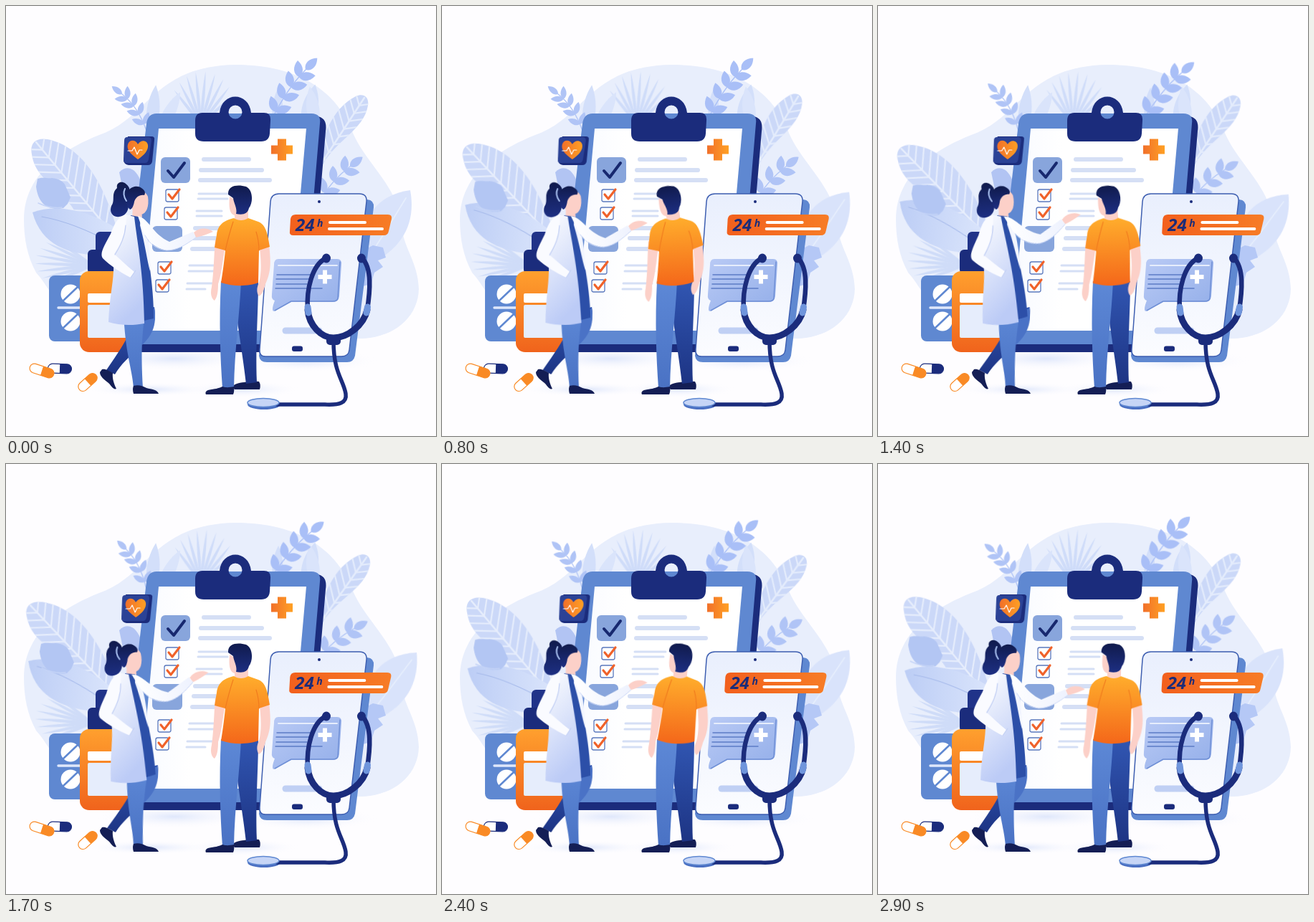
Recreate the animation shown at these times as an HTML page. Size 600x600 px, loop 3000 ms.

```html
<!DOCTYPE html>
<html lang="en">
<head>
<meta charset="utf-8">
<title>Online health check</title>
<style>
html, body { margin: 0; width: 100%; height: 100%; overflow: hidden; background: #fefdff; }
svg { display: block; width: 600px; height: 600px; }
.ln { fill: none; stroke-linecap: round; stroke-linejoin: round; }
text { font-family: "Open Sans", "Noto Sans", sans-serif; font-weight: 700; font-style: italic; fill: #1c2c78; }
</style>
</head>
<body>
<svg id="stage" viewBox="0 0 600 600" xmlns="http://www.w3.org/2000/svg"></svg>
<script>
const NAVY = '#1b2c7c', BLUE = '#5f88d1', SKIN = '#fcd0c8', INK = '#141e55';

const path = (d, fill, more = '') => `<path d="${d}" fill="${fill}" ${more}/>`;
const line = (d, color, w = 2) => `<path class="ln" d="${d}" stroke="${color}" stroke-width="${w}"/>`;
const rect = (x, y, w, h, r, fill, more = '') =>
  `<rect x="${x}" y="${y}" width="${w}" height="${h}" rx="${r}" fill="${fill}" ${more}/>`;
const oval = (x, y, rx, ry, fill, more = '') =>
  `<ellipse cx="${x}" cy="${y}" rx="${rx}" ry="${ry}" fill="${fill}" ${more}/>`;
const group = (id, body) => `<g id="${id}">${body}</g>`;
const grad = (name, a, b, x2 = 0, y2 = 1) =>
  `<linearGradient id="${name}Fill" x2="${x2}" y2="${y2}"><stop stop-color="${a}"/><stop offset="1" stop-color="${b}"/></linearGradient>`;
const use = name => `url(#${name}Fill)`;

function leaf(x, y, deg, len, w, fill) {
  const d = `M0,0C${len * .2},${-w} ${len * .65},${-w} ${len},0C${len * .65},${w} ${len * .2},${w} 0,0Z`;
  return path(d, fill, `transform="translate(${x},${y}) rotate(${deg})"`);
}

// Curved stem with leaf pairs and one leaf at the tip.
function branch([x0, y0], [cx, cy], [x1, y1], pairs, len, w, fill) {
  let out = line(`M${x0},${y0}Q${cx},${cy} ${x1},${y1}`, fill, 1.4);
  const deg = (x, y) => Math.atan2(y, x) * 180 / Math.PI;
  for (let i = 0; i < pairs; i++) {
    const t = .14 + .68 * i / (pairs - 1), u = 1 - t;
    const x = u * u * x0 + 2 * u * t * cx + t * t * x1;
    const y = u * u * y0 + 2 * u * t * cy + t * t * y1;
    const a = deg(u * (cx - x0) + t * (x1 - cx), u * (cy - y0) + t * (y1 - cy));
    out += leaf(x, y, a - 45, len, w, fill) + leaf(x, y, a + 45, len, w, fill);
  }
  return out + leaf(x1, y1, deg(x1 - cx, y1 - cy), len, w, fill);
}

function fan(x, y, from, to, n, len, fill) {
  let out = '';
  for (let i = 0; i < n; i++) {
    const k = i / (n - 1);
    out += leaf(x, y, from + (to - from) * k, len * (.82 + .18 * Math.sin(Math.PI * k)), 2.8, fill);
  }
  return out;
}

// Broad leaf with pale veins on both sides of a straight rib.
function veined(id, d, [x0, y0], [x1, y1], n, len, fill, vein) {
  let veins = line(`M${x0},${y0}L${x1},${y1}`, vein, 2.5);
  const a = Math.atan2(y1 - y0, x1 - x0);
  for (let i = 1; i < n; i++) {
    const x = x0 + (x1 - x0) * i / n, y = y0 + (y1 - y0) * i / n;
    for (const s of [-.85, .85])
      veins += line(`M${x},${y}l${len * Math.cos(a + s)},${len * Math.sin(a + s)}`, vein, 2.2);
  }
  return `<clipPath id="${id}Clip"><path d="${d}"/></clipPath>` +
    path(d, fill) + `<g clip-path="url(#${id}Clip)">${veins}</g>`;
}

const bars = (list, color, w) => list.map(([x, y, x2]) => line(`M${x},${y}H${x2}`, color, w)).join('');

const tick = (x, y) =>
  rect(x, y, 18, 17, 2.5, '#fff', 'stroke="#5a78bd" stroke-width="1.3"') +
  line(`M${x + 4},${y + 7}l5,6l10,-13`, '#f0622a', 3.2);

const plus = (x, y, r, w, fill) =>
  path(`M${x - w},${y - r}h${2 * w}v${r - w}h${r - w}v${2 * w}h${w - r}v${r - w}h${-2 * w}v${w - r}h${w - r}v${-2 * w}h${r - w}z`, fill);

const pill = (x, y, deg, len, color) => `<g transform="translate(${x},${y}) rotate(${deg})">` +
  rect(-len / 2, -6.5, len, 13, 6.5, '#fff', `stroke="${color}" stroke-width="1.2"`) +
  path(`M0,-6.5H${len / 2 - 6.5}a6.5,6.5 0 0 1 0,13H0z`, color) + '</g>';

const defs = '<defs>' +
  grad('shirt', '#ffad2c', '#f4671a') + grad('bottle', '#ffa02e', '#f0631c') +
  grad('banner', '#f2601d', '#f77c26', 1, 0) + grad('plus', '#f1702a', '#ffa024', 1, 0) +
  grad('coat', '#ffffff', '#bccbf6', .3) + grad('sleeve', '#ffffff', '#eef2fe', 1, 0) +
  grad('leafy', '#bccdf5', '#dce6fc', 1, 0) + grad('screen', '#e9effd', '#fbfcff') +
  grad('paper', '#f8faff', '#ffffff', .3, 0) + grad('jeans', '#5d88d6', '#4a72c4') +
  grad('dark', '#3156b2', '#1d3484') + grad('bubble', '#b9caf5', '#93aee9', 1, 1) +
  grad('hair', '#101a4c', '#1d2f82') +
  '<radialGradient id="floorFill"><stop stop-color="#dfe7fb"/><stop offset="1" stop-color="#fefdff" stop-opacity="0"/></radialGradient></defs>';

const backdrop =
  path('M25,298C25,240 70,204 130,180C200,156 205,84 320,82C410,82 460,120 482,172C498,216 546,250 551,300C553,338 575,355 576,395C575,435 540,465 490,464C350,450 180,470 90,425C62,408 60,392 42,372C30,350 25,325 25,298Z', '#e8eefc') +
  oval(235, 492, 110, 17, use('floor')) + oval(200, 535, 90, 10, use('floor')) +
  oval(330, 535, 80, 12, use('floor')) + oval(420, 495, 100, 16, use('floor'));

const plants =
  group('fanTop', fan(272, 165, -128, -42, 9, 74, '#cfdcf9')) +
  leaf(202, 178, -84, 68, 12, '#d3dffa') + leaf(214, 175, -62, 62, 11, '#dae4fb') +
  leaf(378, 172, -88, 58, 10, '#d3dffa') + leaf(418, 172, -78, 64, 15, '#d3dffa') +
  leaf(432, 170, -98, 58, 12, '#dae4fb') +
  group('twigLeft', branch([196, 174], [184, 140], [162, 123], 4, 18, 5.4, '#b0c4f6')) +
  group('twigTop', branch([370, 160], [392, 115], [418, 89], 4, 23, 8, '#a9bff7')) +
  group('bladeRight', veined('br', 'M434,230C438,185 455,143 488,126C499,121 507,127 505,139C499,174 460,186 440,225Z',
    [436, 226], [500, 128], 9, 34, '#cbd8f8', '#e4ecfc')) +
  group('twigRight', branch([440, 268], [456, 242], [480, 224], 3, 22, 7.6, '#b0c4f6')) +
  group('leafRight', path('M498,362C491,308 508,265 564,257C572,300 556,338 505,362Z', '#d9e3fb') +
    line('M500,360Q530,315 558,268', '#e6eefd', 1.8)) +
  path('M500,340L512,334L526,337L530,351L519,355L526,364L514,372L509,388L494,392Z', '#b5c8f6') +
  group('bladeLeft', veined('bl', 'M160,330C140,250 108,196 58,186C40,183 33,193 36,207C43,255 98,252 112,330Z',
    [148, 318], [42, 190], 12, 54, '#cbd8f8', '#e6edfc')) +
  path('M158,232C172,218 186,232 190,252L186,284L168,280Z', '#b2c4f3') +
  group('fanLeft', fan(122, 362, 158, 214, 8, 82, '#cfdcf8')) +
  group('leafBroad', path('M37,288C75,274 125,288 165,318L160,345C112,352 52,346 37,288Z', use('leafy')) +
    line('M50,294Q95,302 150,332', '#a5b9ea', 1.2)) +
  group('leafDark', path('M44,241C52,238 58,241 64,240C74,241 81,245 83,251L90,267L86,276L80,282C58,286 45,276 42,252Z', '#b3c6f3') +
    line('M45,275Q62,283 78,281', '#c5d4f7', 1.5));

const clipboard =
  path('M210,154H434Q449,156 446,175L420,483H172Q158,483 160,470Z', NAVY) +
  path('M210,150H426Q440,150 438,164L412,472H170Q160,472 161,462L196,164Q198,150 210,150Z', BLUE) +
  path('M213,171H419L394,453H187Z', use('paper')) +
  path('M274,149H298C301,119 339,119 342,149H360Q370,149 369,160L368,178Q367,189 356,189H276Q264,189 264,178V160Q264,149 274,149ZM310.500,148a9.500,9.500 0 1 0 19,0a9.500,9.500 0 1 0 -19,0Z', NAVY, 'fill-rule="evenodd"') +
  plus(385, 200.500, 15, 6, use('plus')) +
  rect(216, 211, 41, 36, 6, '#88a5dc') + line('M226,230l8,9l15,-20', '#17286f', 4) +
  rect(204, 307, 42, 36, 6, '#88a5dc') +
  bars([[276, 214, 339], [272, 229, 357], [271, 243, 368]], '#d5dff5', 6) +
  bars([[269, 262, 312], [268, 269, 309], [266, 286, 301], [266, 293, 301],
    [256, 362, 296], [255, 370, 296], [253, 387, 293], [252, 395, 278]], '#d5dff5', 3) +
  bars([[264, 310, 306], [262, 324, 292], [260, 339, 292]], '#d5dff5', 6) +
  tick(223, 256) + tick(221, 281) + tick(212, 357) + tick(209, 382);

const heart = group('heart',
  path('M170,182H203Q208,182 207,187L204,217Q203,222 198,222H171Q165,221 164,216Z', NAVY) +
  path('M169,183H199Q203,183 203,188L199,214Q198,219 194,219H168Q164,219 164,214L165,188Q165,183 169,183Z', '#2b4296') +
  path('M184,214C173,206 168,200 170,193C172,186 181,186 184,193C188,186 197,187 198,194C199,201 193,208 184,214Z', use('plus')) +
  line('M170,202h6l3,-5l4,10l3,-6h4', '#fff', 1.2));

const tablet =
  path('M384,270H504Q514,271 513,281L487,488Q485,497 476,497H364Q354,497 353,488Z', BLUE) +
  path('M381,262H493Q504,262 503,273L479,480Q478,489 468,489H362Q353,489 354,479L369,273Q370,262 381,262Z', use('screen'), 'stroke="#3d5eb0" stroke-width="1.5"') +
  oval(437, 273, 2, 2, NAVY) + rect(399, 474.500, 15, 7.500, 3, NAVY) +
  line('M390,453H437', '#c0d0f4', 9) +
  path('M380,353H462Q469,353 468,361L465,405Q464,413 456,413H398L373,426Q370,424 375,411Q370,410 371,402L374,361Q374,353 380,353Z', use('bubble')) +
  line('M466,357L463,408Q462,412 456,412H398L375,425', '#7090d6', 1.5) +
  bars([[380, 362, 462]], '#e6edfc', 2) +
  bars([[378, 375, 430], [377, 381, 428], [377, 388, 420], [376, 394, 441]], '#5c7cc6', 1.5) +
  plus(445, 378, 9.500, 3, '#fff');

const banner = group('banner',
  path('M404,291H533Q539,291 538,297L534,314Q533,320 527,320H401Q395,320 396,314L397,297Q398,291 404,291Z', use('banner')) +
  '<text x="404" y="314" font-size="24">24</text><text x="434" y="308" font-size="14">h</text>' +
  bars([[452, 302, 501], [451, 311, 525]], '#fff', 4));

const scope =
  oval(360, 556, 23, 7, '#4a6fc2') + line('M378,556H445C465,557 476,554 474,541C471,522 457,512 457,468', NAVY, 5.5) +
  oval(359, 553.500, 22, 6, '#c6d5f6', `stroke="${BLUE}" stroke-width="1.5"`) +
  line('M446,352C427,362 419,395 421,424M497,352C511,366 508,398 504,424', NAVY, 6.5) +
  line('M421,424C423,446 440,463 457,463C476,463 499,446 504,424', NAVY, 9) +
  line('M421,420l1,8M504.500,420l-1.500,8', '#6f95dc', 9) +
  oval(447, 352, 6, 6.5, NAVY) + oval(496, 352, 6, 6.5, NAVY) + rect(447, 459, 20, 14, 5, NAVY);

const medicine =
  rect(60, 376, 58, 92, 8, BLUE) + line('M73,421H104', '#dfe8fb', 3.5) +
  [402, 440].map(y => oval(90, y, 13.5, 13.5, '#fff') + line(`M80,${y + 9}L100,${y - 10}`, BLUE, 2.5)).join('') +
  rect(125, 315, 34, 32, 6, '#203389') + rect(114, 340, 50, 34, 6, NAVY) +
  rect(103, 370, 76, 113, 13, use('bottle')) +
  rect(114, 401, 50, 13, 2, '#fff') + rect(114, 417, 60, 46, 2, '#e6edfc') +
  pill(75, 506, 2, 33, NAVY) + pill(50, 509, 18, 35, '#f98a25') + pill(114, 525, -42, 31, '#f98a25');

const doctorLegs = group('doctorLegs',
  path('M188,425L207,420C212,446 196,464 184,478C172,490 160,500 152,514L140,508C152,490 158,482 166,468Z', use('dark')) +
  path('M189,428L207,422C211,446 203,460 190,473Z', '#4a72c6') +
  path('M164,425H194C190,460 188,480 191,533H178C176,505 166,485 164,425Z', use('jeans'))) +
  path('M134,507C139,506 143,509 149,512C148,520 151,528 154,534C150,536 147,530 143,526C137,521 131,517 131,511Z', INK) +
  path('M178,530C185,528 190,530 196,533C203,535 211,535 213,541H178Q176,535 178,530Z', INK);

const doctor = group('doctor',
  path('M172,254C166,242 153,244 155,254C146,262 153,271 147,279C143,290 152,297 162,293C172,289 171,278 173,268Z', use('hair')) +
  path('M177,278H189L190,298L176,297Z', SKIN) +
  path('M174,292L190,295C195,330 207,390 206,436L188,440L180,340Z', '#2c4fa8') +
  path('M188,294C197,302 201,335 201,370C197,356 194,332 187,306Z', '#f3f6ff') +
  path('M167,291L179,294C183,330 192,370 193,443C178,446 158,446 143,441C144,410 149,390 150,370L152,310Z', use('coat')) +
  path('M168,291C156,294 152,302 146,318C138,333 130,345 135,352C145,362 160,372 174,379L179,371C168,362 158,352 151,346C160,332 168,318 168,291Z', '#fafbff') +
  line('M152,347C160,334 166,322 167,306M174,379L181,369', '#c3d0f4', 1.2) +
  path('M173,264C175,254 192,253 198,266C200,280 196,290 188,291C178,290 171,280 173,264Z', SKIN) +
  path('M168,271C165,255 181,248 189,254C194,257 195,261 193,264C186,263 181,267 179,273C178,279 176,283 173,284C169,280 168,275 168,271Z', use('hair')) +
  line('M166,255Q162,263 168,272', '#a9c0f0', 2) +
  group('arm',
    path('M262,316C270,309 281,309 289,315C282,318 277,320 265,323Z', SKIN) +
    path('M184,293C199,296 204,318 228,329L261,315L265,323C250,334 238,341 224,341C208,338 198,328 192,316Z', use('sleeve')) +
    line('M194,320C201,333 210,339 224,341C238,341 250,334 265,323', '#ccd8f6', 1)));

const manLegs =
  path('M318,529C325,524 335,526 340,523L353,524Q356,529 354,535H319Q316,532 318,529Z', INK) +
  path('M320,384L352,384C352,430 348,470 350,525L335,527C332,500 327,470 320,420Z', use('dark')) +
  path('M300,384H328C326,430 319,480 318,533H302C299,490 297,440 300,384Z', use('jeans')) +
  path('M302,531C308,533 312,532 318,531Q319,538 317,542H279Q277,538 282,536C292,534 296,534 302,531Z', INK);

const man = group('man',
  group('manArmLeft', path('M292,326L306,334C302,360 300,376 296,388C296,398 295,406 291,411C286,408 285,400 287,392C290,370 290,352 292,326Z', SKIN)) +
  group('manArmRight', path('M353,330L366,327C371,360 369,372 362,388C360,396 358,402 353,405C349,400 350,392 353,386C357,372 356,352 353,330Z', SKIN)) +
  group('manHead',
    path('M312,266C311,278 311,290 319,292V302H338V280Z', SKIN) +
    path('M310,263C309,249 325,249 335,252C345,257 345,274 339,282C337,290 331,292 321,290C323,282 318,276 317,268Z', use('hair'))) +
  path('M318,296C305,299 296,304 294,319L291,337L306,341C304,360 302,374 300,386C318,392 340,391 352,386L353,341L368,336C365,316 362,305 352,301L338,296C332,300 324,300 318,296Z', use('shirt')) +
  line('M317,301C312,316 309,328 306,341M349,315Q353,328 353,341', '#f07a1e', 1.1));

document.getElementById('stage').innerHTML = defs + backdrop + plants + clipboard + heart + tablet + banner +
  medicine + doctorLegs + doctor + manLegs + man + scope;

// Sway table: part, kind, swing (degrees or px), time of peak in ms, pivot.
const LOOP = 3000, STEPS = 30;
const turn = v => `rotate(${v}deg)`;
const skew = v => `skewX(${v}deg)`;
const shift = (x, y) => v => `translate(${x * v}px, ${y * v}px)`;
const SWAY = [
  ['twigTop', turn, 4.3, 1900, '372px 155px'],
  ['twigLeft', turn, 4.3, 1900, '195px 172px'],
  ['twigRight', turn, 5.5, 1900, '443px 262px'],
  ['bladeRight', turn, 2.6, 2150, '442px 215px'],
  ['bladeLeft', turn, 2.5, 2780, '150px 310px'],
  ['leafBroad', turn, 3.8, 1350, '150px 230px'],
  ['leafDark', shift(.5, 1), 5, 1600, '0 0'],
  ['leafRight', turn, 2.8, 1600, '505px 355px'],
  ['fanTop', turn, 1.4, 2100, '272px 165px'],
  ['fanLeft', turn, 1.4, 1400, '122px 362px'],
  ['heart', shift(1, 0), 1.7, 2850, '0 0'],
  ['banner', shift(1, 0), 1.7, 750, '0 0'],
  ['doctor', turn, 2.2, 100, '170px 398px'],
  ['arm', turn, 4.6, 30, '192px 300px'],
  ['doctorLegs', skew, 1.2, 100, '180px 535px'],
  ['man', turn, 2.7, 2350, '325px 395px'],
  ['manHead', turn, 4, 2350, '328px 297px'],
  ['manArmLeft', turn, -1.8, 2350, '300px 322px'],
  ['manArmRight', turn, -1.8, 2350, '360px 322px']
];

for (const [id, kind, swing, peak, pivot] of SWAY) {
  const part = document.getElementById(id);
  const wave = ms => Math.cos(2 * Math.PI * (ms - peak) / LOOP);
  part.style.transformOrigin = pivot;
  const frames = Array.from({ length: STEPS + 1 }, (_, i) => ({
    offset: i / STEPS,
    easing: 'step-end',
    transform: kind(swing * (wave(i * LOOP / STEPS) - wave(0)))
  }));
  part.animate(frames, { duration: LOOP, iterations: Infinity });
}
</script>
</body>
</html>
```
